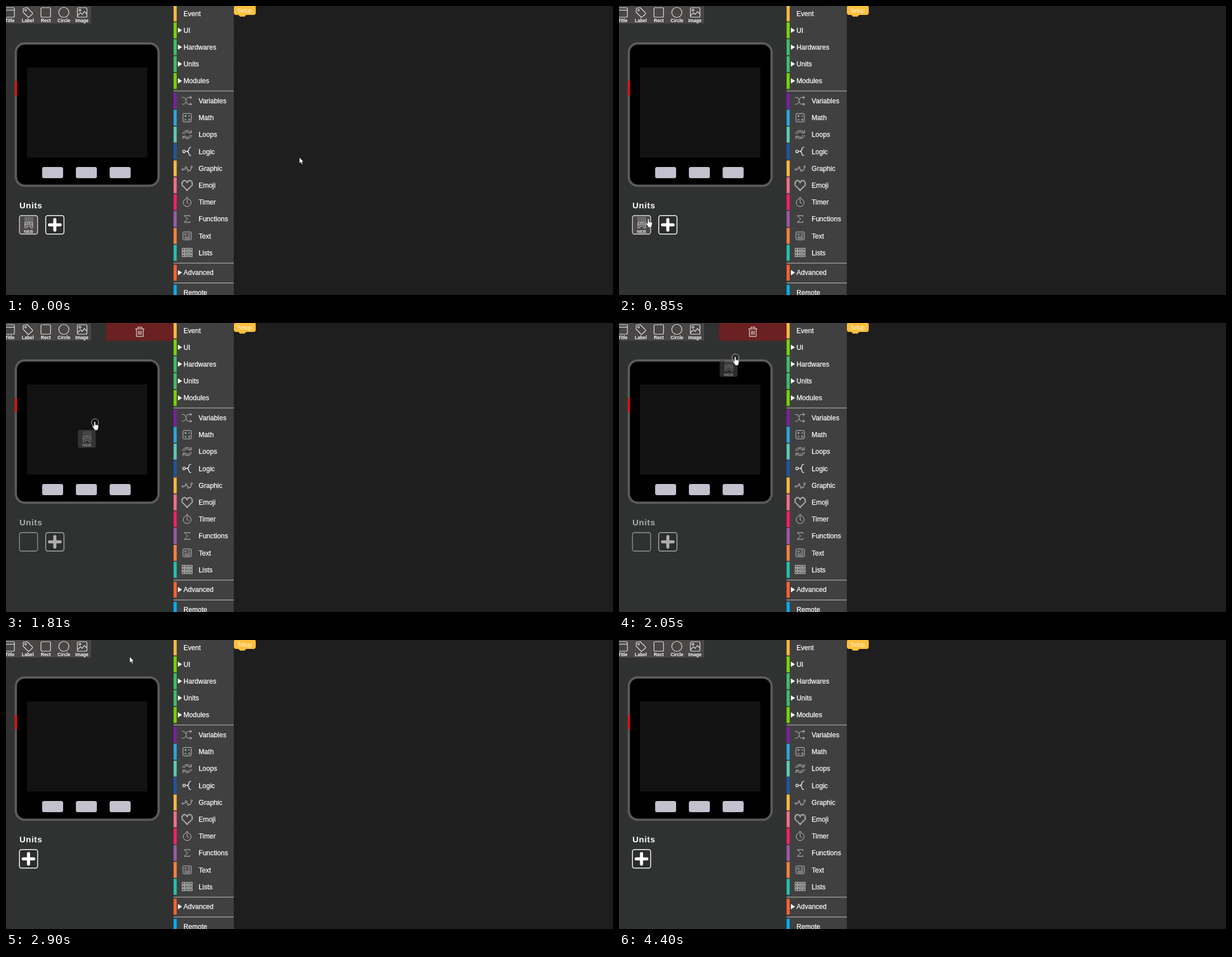
Recreate the animation shown at these times as an HTML page. Size 1084 by 517 pixels, loop 4520 ms.

```html
<!DOCTYPE html>
<html lang="en">
<head>
<meta charset="utf-8">
<title>Remove a unit</title>
<style>
  html, body { margin: 0; width: 100%; height: 100%; overflow: hidden; background: #1e1e1e; }
  svg { display: block; font-family: "Liberation Sans", Arial, sans-serif; fill: #fff; }
  .line { fill: none; stroke: #c9c9c9; stroke-width: 1; }
  .bold { stroke: #f4f4f4; stroke-width: 1.3; }
  .row { font-size: 12.1px; stroke: #fff; stroke-width: .25px; }
  .tool { font-size: 8.2px; font-weight: 700; text-anchor: middle; }
  .tag { font-size: 8px; font-weight: 700; text-anchor: middle; fill: #e4e4e4; }
  .head { font-size: 15px; font-weight: 700; letter-spacing: .7px; }
</style>
</head>
<body>
<svg width="1084" height="517" viewBox="0 0 1084 517">
  <defs>
    <pattern id="dots" x="407" y="-2" width="13.4" height="13.4" patternUnits="userSpaceOnUse">
      <rect x="6" y="6" width="1" height="1" fill="#2e2e2e"/>
    </pattern>
    <g id="unit">
      <rect width="32" height="32" rx="3" fill="#4d4949"/>
      <rect x="9" y="2" width="15" height="9" fill="#777"/>
      <path d="M11.5 2V11M14.5 2V11M17.5 2V11M20.500 2V11" stroke="#565252"/>
      <g class="line">
        <path d="M9.5 11.500V21.500H13V18.500H20V21.500H23.500V11.500Z"/>
        <circle cx="11.500" cy="15.500" r="1.600"/><circle cx="21.500" cy="15.500" r="1.600"/>
        <rect x="14.500" y="12.500" width="4" height="3"/>
      </g>
      <text class="tag" x="16" y="30.300">NEB</text>
    </g>
  </defs>

  <rect x="407" width="677" height="517" fill="#1e1e1e"/>
  <rect x="407" width="677" height="517" fill="url(#dots)"/>
  <path d="M411 -1H442Q446 -1 446 3V12Q446 16 442 16H429L426 19H418L415 16H411Q407 16 407 12V3Q407 -1 411 -1Z" fill="#ffbf3c"/>
  <text x="413" y="11.500" font-size="10" fill="#fff6e0">Setup</text>

  <rect width="299" height="517" fill="#303231"/>
  <rect width="152" height="31.500" fill="#494646"/>
  <g class="line" style="stroke:#e6e6e6;stroke-width:1.200">
    <rect x="-2" y="3" width="17" height="17" rx="2"/><path d="M-2 7.500H15"/>
    <path d="M31 4L38 3L47.500 12.500Q48 13.500 47 14.500L41 20Q40 20.500 39 19.500L30.500 11Z"/><circle cx="35" cy="7.500" r="1.500"/>
    <rect x="62.500" y="3" width="17" height="17" rx="2"/>
    <circle cx="103.300" cy="11.500" r="9"/>
    <rect x="127.500" y="3" width="17" height="17" rx="2"/><circle cx="132" cy="7.500" r="1.700"/>
    <path d="M128 17L133 12L136 15L140 10L144 14"/>
  </g>
  <g id="tools" class="tool"></g>

  <rect x="17.500" y="67" width="255" height="254.500" rx="16" fill="#000" stroke="#5c5c5c" stroke-width="4"/>
  <rect x="16" y="134" width="3.500" height="26" fill="#f00808"/>
  <rect x="37.500" y="110" width="215" height="161" fill="#121212"/>
  <g id="buttons" fill="#c4c1ce"></g>

  <use id="card" href="#unit" x="24.200" y="375.500"/>
  <g id="dim">
    <text class="head" x="24" y="361.700">Units</text>
    <rect id="slot" x="24" y="375" width="32.500" height="33" rx="3.500" fill="none" stroke="#e0e0e0" stroke-width="1.300"/>
    <g id="plus">
      <rect x="71" y="375" width="32.500" height="33" rx="3.500" fill="#2b2d2c" stroke="#fff" stroke-width="1.500"/>
      <path d="M87.200 382V401M77.700 391.500H96.700" stroke="#fff" stroke-width="5.500" stroke-linecap="round"/>
    </g>
  </g>

  <g id="bin">
    <rect x="178.600" width="121" height="31.700" fill="#6b2022"/>
    <path class="line" style="stroke:#cdb9b9;stroke-width:1.500" d="M231 10.500H247M235.500 10V7.500H242.500V10M233 11V24H245V11M236.500 14V21M239 14V21M241.500 14V21"/>
  </g>

  <rect x="299.300" width="107.500" height="517" fill="#404040"/>
  <g id="menu"></g>

  <use id="ghost" href="#unit" opacity=".58"/>
  <circle id="ring" r="6.300" fill="#000" fill-opacity=".2" stroke="#c4c4c4"/>
  <path id="arrow" d="M0 0V10.500L2.500 8.300L4.300 12.200L6 11.500L4.300 7.700H7.400Z" stroke="#111" stroke-width=".5"/>
  <path id="hand" d="M-1.300 1V8.600L-2.600 7.200C-3.600 6.400 -4.800 7.300 -4.200 8.400L-.6 13.200V15H5.400V13.200C6.400 11.400 6.600 10 6.600 6.600C6.600 5.400 5 5.400 4.800 6.300C4.700 5 3 5 2.900 5.900C2.800 4.800 1.400 4.800 1.300 5.600V1C1.300 -.7 -1.300 -.7 -1.300 1Z" stroke="#222" stroke-width=".6"/>
</svg>
<script>
const $ = id => document.getElementById(id);
const dot = (x, y, r = 1.5) => `<circle cx="${x}" cy="${y}" r="${r}"/>`;
const box = (x, y, w, h, r = 0) => `<rect x="${x}" y="${y}" width="${w}" height="${h}" rx="${r}"/>`;
const line = d => `<path d="${d}"/>`;

// Icons are drawn around their own centre.
const icons = {
  Variables: line('M-9 -6H-6C-1 -6 -3 6 2 6H8M-9 6H-6C-4 6 -3.5 4 -2.5 2M-1.5 -2C-.5 -5 0 -6 2 -6H8M5 -8.5L8 -6L5 -3.5M5 3.5L8 6L5 8.5'),
  Math: box(-7.5, -7.5, 15, 15, 2) + line('M-5 -3H-1M-3 -5V-1M2 -3H5.5M-4.5 2L-1.5 5M-1.5 2L-4.5 5M2 2.5H5.5M2 4.5H5.5'),
  Loops: line('M-8 -1C-7 -8 3 -9 6 -4M7.5 -8V-3H2.5M8 1C7 8 -3 9 -6 4M-7.5 8V3H-2.5M-5 -1C-4 -5 1 -6 3 -3M5 1C4 5 -1 6 -3 3'),
  Logic: `<g class="bold">${dot(-5.5, 0, 2.3) + line('M-3 0H0Q3 -1 3 -4T7 -7.5M0 0Q3 1 3 4T7 7.5')}</g>`,
  Graphic: dot(-8, 2) + dot(-2, -1.5) + dot(2, 4) + dot(8, -3) + line('M-6.5 2H-4L-3 -.5M-1 -.5L1 3M3.5 4H6L7.5 -1.5'),
  Emoji: '<path d="M0 9L-9 0V-5L-6 -8.5H-3L0 -5L3 -8.5H6L9 -5V0Z" stroke-width="2.4" stroke-dasharray="2 .9"/>',
  Timer: dot(0, 1, 7) + line('M0 -4V1L3 3M-2 -8H2'),
  Functions: line('M5 -4V-6H-5L1 0L-5 6H5V4'),
  Text: box(-7.5, -7, 15, 14, 1.5) + dot(-3, -2.5) + line('M1 -4H5.5M1 -1H5.5M-5 2H5.5M-5 4.5H5.5'),
  Lists: [-8, -2.5, 3].map(y => box(-9, y, 3.5, 4) + box(-4.5, y, 13.5, 4) + line(`M-2.5 ${y + 2}H7`)).join('')
};

const row = (name, color, y, arrow) => {
  const icon = icons[name];
  return `<rect x="299.3" y="${y - 14}" width="5.5" height="28.3" fill="${color}"/>` +
    (arrow ? `<path d="M307 ${y - 4.7}L314.3 ${y}L307 ${y + 4.7}Z"/>` : '') +
    (icon ? `<g class="line" transform="translate(323.5 ${y})">${icon}</g>` : '') +
    `<text class="row" x="${icon ? 344 : 317}" y="${Math.round(y + 4.3)}">${name}</text>`;
};
const group = (top, items, arrow) =>
  items.map(([name, color], i) => row(name, color, top + i * 30.2, arrow && name !== 'Event')).join('');

$('menu').innerHTML =
  group(13.2, [['Event', '#fab83f'], ['UI', '#78d40a'], ['Hardwares', '#3dbf67'],
    ['Units', '#3fbd69'], ['Modules', '#76d206']], true) +
  group(169.6, [['Variables', '#7b1fa2'], ['Math', '#2ea5dc'], ['Loops', '#5bc9b8'], ['Logic', '#2055a2'],
    ['Graphic', '#f9b93f'], ['Emoji', '#f47083'], ['Timer', '#f81f63'], ['Functions', '#9b59a8'],
    ['Text', '#f5813f'], ['Lists', '#26c0ad']]) +
  group(477, [['Advanced', '#ff6232']], true) + group(513, [['Remote', '#03b0f0']]) +
  [151.5, 459.5, 495].map(y => `<rect x="299" y="${y}" width="108" height="1" fill="#c4c4c4"/>`).join('');
$('tools').innerHTML = ['Title', 'Label', 'Rect', 'Circle', 'Image']
  .map((name, i) => `<text x="${6.8 + i * 32.2}" y="28.5">${name}</text>`).join('');
$('buttons').innerHTML = [0, 1, 2].map(i => box(64.5 + i * 60.3, 288, 37.5, 20, 3.5)).join('');

const LOOP = 4520, STEP = 120, HOVER = 850, GRAB = 1210, DROP = 2900, LEAVE = 3650, EXIT = 3800, GONE = 4400;

const easeOut = u => 1 - (1 - u) ** 2;
const easeBoth = u => u * u * (3 - 2 * u);

// Each leg is a cubic curve that goes on from the end of the one before.
const home = [524, 271];
const legs = [
  { from: 130, to: HOVER, ease: easeOut, a: [308, 170], b: [151, 207], end: [53, 382] },
  { from: HOVER, to: GRAB, ease: easeOut, end: [45, 390] },
  { from: GRAB, to: 2230, ease: easeBoth, a: [127, 318], b: [153, 156], end: [225, 30] },
  { from: DROP - 1, to: DROP, ease: easeOut, end: [221, 30] },
  { from: LEAVE - 1, to: LEAVE, ease: easeOut, end: [237, 36] },
  { from: EXIT - STEP, to: 4280, ease: easeOut, a: [833, 232], b: [1107, 392], end: [1061, 516] }
];

function pointer(time) {
  let pos = home;
  for (const { from, to, ease, end, a = pos, b = end } of legs) {
    if (time <= from) break;
    const u = ease(Math.min((time - from) / (to - from), 1)), v = 1 - u;
    pos = pos.map((p, i) => p * v ** 3 + 3 * a[i] * u * v * v + 3 * b[i] * u * u * v + end[i] * u ** 3);
  }
  return pos;
}

// The picture is refreshed every STEP ms, counted anew from each of these times.
function snap(t) {
  const base = [EXIT, LEAVE, DROP].find(b => t >= b) || 250;
  return base + Math.floor((t - base) / STEP) * STEP;
}

const show = (id, on) => $(id).setAttribute('visibility', on ? 'visible' : 'hidden');
const move = (id, x, y) => $(id).setAttribute('transform', `translate(${x} ${y})`);

function draw(now) {
  const t = now % LOOP, time = snap(t);
  const drag = t >= GRAB && t < DROP, hand = t >= HOVER && t < DROP;
  const [x, y] = pointer(time);
  const [gx, gy] = pointer(time - 52); // the dragged unit lags behind

  move('arrow', x, y);
  move('hand', x - .5, y - 1);
  move('ring', x, y);
  move('ghost', gx - 19, gy - 17);
  move('plus', t < DROP ? 0 : -47, 0);
  $('dim').setAttribute('opacity', drag ? .6 : 1);
  show('arrow', !hand && t < GONE);
  show('hand', hand);
  show('ring', drag);
  show('ghost', drag);
  show('bin', drag);
  show('card', t < GRAB);
  show('slot', t < DROP);
}

const start = performance.now();
function tick() {
  draw(performance.now() - start);
  requestAnimationFrame(tick);
}
tick();
</script>
</body>
</html>
```
